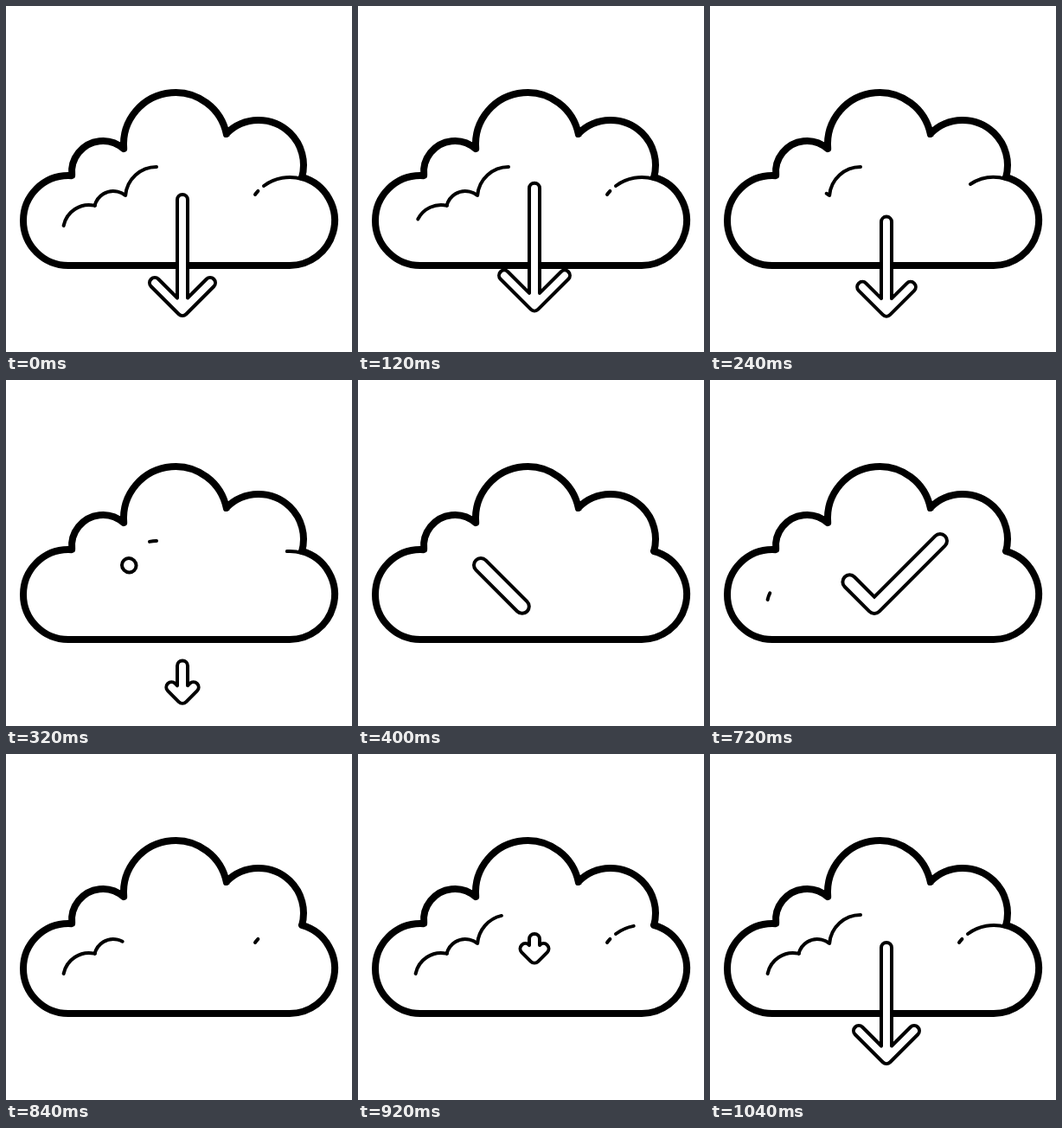
Write an HTML page with a canvas that moves like this. It is 400 px wide and 400 px high and loops after 1.12 s.

```html
<!DOCTYPE html>
<html lang="en">
<head>
<meta charset="utf-8">
<title>Cloud download</title>
<style>
html, body { margin: 0; width: 100%; height: 100%; overflow: hidden; background: #fff; }
canvas { display: block; }
</style>
</head>
<body>
<canvas id="stage" width="400" height="400"></canvas>
<script>
const ctx = document.getElementById('stage').getContext('2d');
const LOOP = 1120, TICK = 40, PI = Math.PI, MID = 204;

// Smooth 0..1 progress between two times
function ease(t, start, end) {
  const u = Math.min(1, Math.max(0, (t - start) / (end - start)));
  return u * u * (3 - 2 * u);
}
const mix = (a, b, k) => a + (b - a) * k;

// Arc through two points around a centre, clockwise
function arc(cx, cy, r, x0, y0, x1, y1) {
  const a = Math.atan2(y0 - cy, x0 - cx);
  let b = Math.atan2(y1 - cy, x1 - cx);
  if (b < a) b += 2 * PI;
  return { cx, cy, r, a, b, len: (b - a) * r };
}
const total = arcs => arcs.reduce((sum, s) => sum + s.len, 0);

const cloud = [
  arc(72, 248, 52, 72, 300, 76, 196),
  arc(112, 192, 36, 76, 196, 136, 165),
  arc(196, 160, 60, 136, 165, 255, 148),
  arc(292, 184, 52, 255, 148, 342, 198),
  arc(328, 248, 52, 342, 198, 328, 300)
];
const leftFold = [
  arc(96, 260, 30, 66.5, 254, 103, 231),
  arc(124, 236, 22, 103, 231, 138, 219),
  arc(174, 222, 36, 138, 219, 174, 186)
];
const rightFold = [arc(328, 248, 50, 288, 218, 342.5, 200)];
const check = [[142, 214], [190, 262], [266, 186]];

function stroke(width, color = '#000') {
  ctx.lineWidth = width;
  ctx.strokeStyle = color;
  ctx.stroke();
}

// White bar with a black rim
function tube(outer, inner) {
  stroke(outer);
  stroke(inner, '#fff');
}

function drawCloud() {
  ctx.beginPath();
  for (const s of cloud) ctx.arc(s.cx, s.cy, s.r, s.a, s.b);
  ctx.closePath();
  stroke(8);
}

// The part of a chain of arcs between two distances
function drawArcs(arcs, from, to) {
  if (to - from < 0.1) return;
  let pos = 0;
  ctx.beginPath();
  for (const s of arcs) {
    const p = Math.max(from - pos, 0), q = Math.min(to - pos, s.len);
    if (q > p) ctx.arc(s.cx, s.cy, s.r, s.a + p / s.r, s.a + q / s.r);
    pos += s.len;
  }
  stroke(4);
}

function drawFolds(t) {
  const leaving = t < 680;
  const l = total(leftFold), r = total(rightFold);
  const span = (len, out, back) => leaving ? [len * out, len] : [0, len * back];
  drawArcs(leftFold, ...span(l, ease(t, 80, 360), ease(t, 680, 960)));
  const [a, b] = span(r, ease(t, 140, 420), ease(t, 760, 1040));
  drawArcs(rightFold, a, Math.min(b, 5.3));
  drawArcs(rightFold, Math.max(a, 14.2), b);
}

function drawCheck(t) {
  const head = ease(t, 312, 520), tail = ease(t, 680, 840);
  if (head - tail < 0.001) return;
  const legs = [0, 1].map(i => Math.hypot(
    check[i + 1][0] - check[i][0], check[i + 1][1] - check[i][1]));
  const sum = legs[0] + legs[1];
  const at = d => {
    const i = d < legs[0] ? 0 : 1;
    const k = (i ? d - legs[0] : d) / legs[i];
    return [0, 1].map(n => mix(check[i][n], check[i + 1][n], k));
  };
  ctx.beginPath();
  ctx.moveTo(...at(tail * sum));
  if (tail * sum < legs[0] && head * sum > legs[0]) ctx.lineTo(...check[1]);
  ctx.lineTo(...at(head * sum));
  tube(20, 12);
}

// Shaft top, tip and arm reach
function arrowPose(t) {
  const rest = [224, 352, 32];
  const blend = (a, b, k) => a.map((v, i) => mix(v, b[i], k));
  if (t >= 880) return blend([212, 214, 6.5], rest, ease(t, 880, 1040));
  const raised = [206, 344.5, 36];
  if (t < 160) return blend(rest, raised, ease(t, 40, 160));
  return blend(raised, [374, 376, 4.5], ease(t, 160, 400));
}

function drawArrow(t) {
  if (t >= 400 && t <= 880) return;
  const [top, tip, arm] = arrowPose(t);
  const r = 6, notch = tip - r - r * Math.SQRT2;
  ctx.beginPath();
  if (arm > 10.3 && top < notch) {
    ctx.arc(MID, top, r, PI, 2 * PI);
    ctx.lineTo(MID + r, notch);
    ctx.arc(MID + arm, tip - arm, r, -0.75 * PI, 0.25 * PI);
    ctx.arc(MID, tip, r, 0.25 * PI, 0.75 * PI);
    ctx.arc(MID - arm, tip - arm, r, 0.75 * PI, 1.75 * PI);
    ctx.lineTo(MID - r, notch);
    ctx.closePath();
    ctx.fillStyle = '#fff';
    ctx.fill();
    stroke(4);
  } else {
    ctx.moveTo(MID, top);
    ctx.lineTo(MID, tip);
    ctx.moveTo(MID - arm, tip - arm);
    ctx.lineTo(MID, tip);
    ctx.lineTo(MID + arm, tip - arm);
    tube(16, 8);
  }
}

function draw(now) {
  const t = Math.floor((now % LOOP) / TICK) * TICK;
  ctx.fillStyle = '#fff';
  ctx.fillRect(0, 0, 400, 400);
  ctx.lineCap = ctx.lineJoin = 'round';
  drawCloud();
  drawFolds(t);
  drawCheck(t);
  drawArrow(t);
}

const begin = performance.now();
function loop() {
  draw(performance.now() - begin);
  requestAnimationFrame(loop);
}
loop();
</script>
</body>
</html>
```
